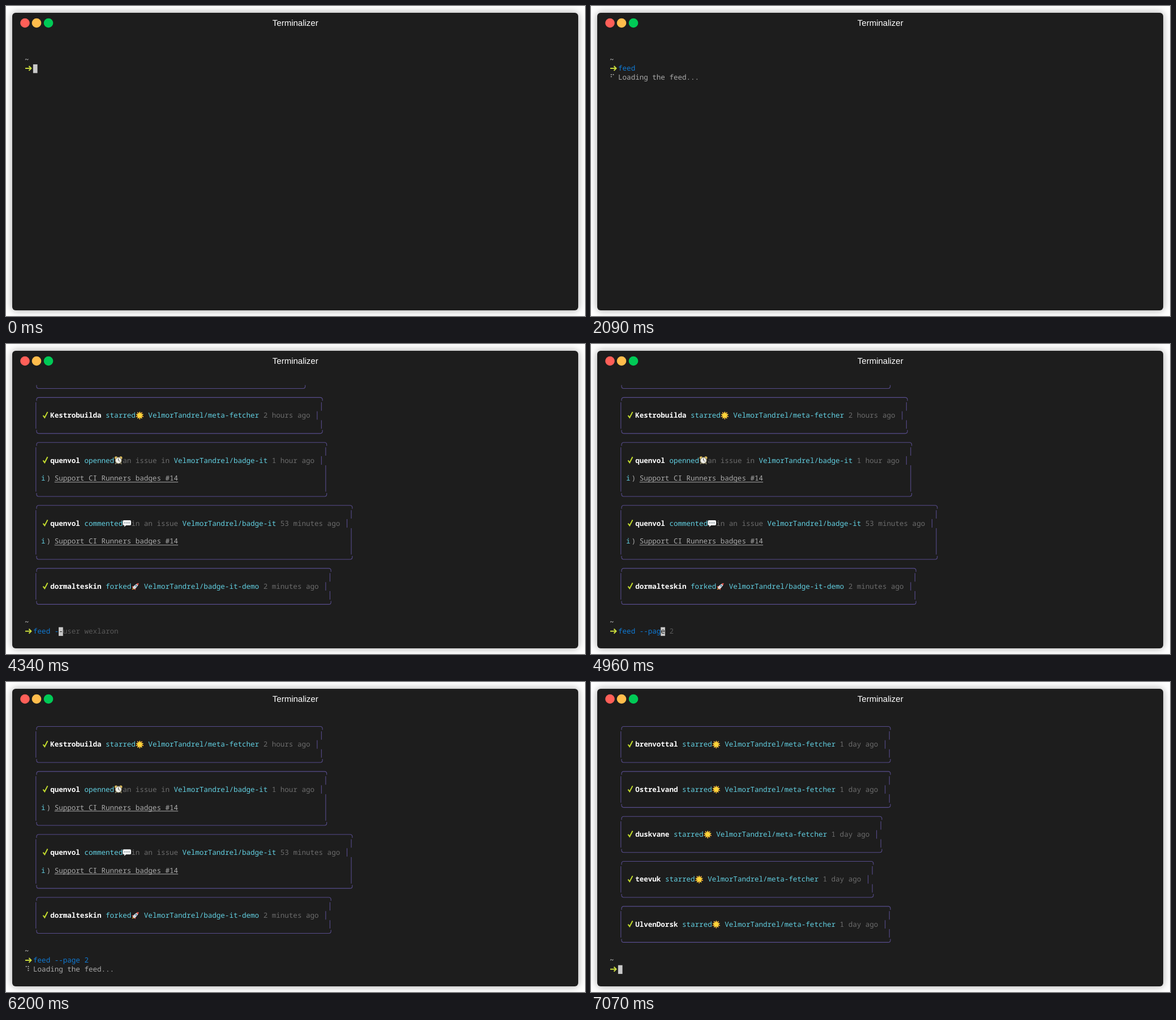
An HTML page for the animation above (8000 ms loop, 1023 by 547 pixels).

```html
<!DOCTYPE html>
<html lang="en">
<head>
<meta charset="utf-8">
<title>Terminal feed</title>
<style>
  html, body { margin: 0; width: 100%; height: 100%; overflow: hidden; background: #fff; }
  .window {
    position: absolute; left: 11px; top: 12px; width: 1000px; height: 525px;
    border-radius: 6px; background: #1d1d1d; box-shadow: 0 0 14px rgba(0, 0, 0, .35);
  }
  svg { position: absolute; left: 0; top: 0; width: 1023px; height: 547px; }
  text {
    font: 12.55px "Noto Sans Mono", "DejaVu Sans Mono", monospace;
    white-space: pre; text-rendering: geometricPrecision; fill: #ababab;
  }
  .title { font: 15px "Liberation Sans", Arial, sans-serif; fill: #fff; text-anchor: middle; }
  .spin { font-family: "DejaVu Sans Mono", monospace; }
  .name { font-weight: 700; fill: #fff; }
  .cyan { fill: #62d0e2; }
  .dim { fill: #6c6c6c; }
  .hint { fill: #595959; }
  .tilde { fill: #d0d0d0; }
  .cmd { fill: #107bd6; }
  .bad { fill: #d63c3c; }
  .under { fill: #1d1d1d; }
  .border { fill: none; stroke: #574c8c; stroke-width: 1.1; }
  .arrow { fill: none; stroke: #c8da3c; stroke-width: 2; }
  .check { fill: none; stroke: #c3dc2e; stroke-width: 2; }
</style>
</head>
<body>
<div class="window"></div>
<svg viewBox="0 0 1023 547">
  <defs>
    <g id="star">
      <path id="rays" fill="none" stroke="#f3a93a" stroke-width="1.8" stroke-linecap="round"/>
      <path id="points" fill="#fdd53a"/>
    </g>
    <g id="clock">
      <path d="M-5.5 6.5L-3 3M5.5 6.5L3 3" stroke="#8d8464" stroke-width="1.8"/>
      <circle cx="-4.2" cy="-4.6" r="2.6" fill="#d9b858"/>
      <circle cx="4.2" cy="-4.6" r="2.6" fill="#d9b858"/>
      <circle r="6" fill="#9c9579"/>
      <circle r="4.7" fill="#f1f1ec"/>
      <path d="M0 -3.5V0L2.4 1.6" fill="none" stroke="#444" stroke-width="1"/>
    </g>
    <g id="bubble">
      <path d="M-5.5 -5.5H5.5Q7.3 -5.5 7.3 -3.5V1.5Q7.3 3.5 5.5 3.5H-1.5L-5 6.2L-4.4 3.5H-5.5Q-7.3 3.5 -7.3 1.5V-3.5Q-7.3 -5.5 -5.5 -5.5Z" fill="#f4f6f7"/>
      <path d="M-3.6 -1h.01M0 -1h.01M3.6 -1h.01" stroke="#6d7b82" stroke-width="2" stroke-linecap="round"/>
    </g>
    <g id="rocket">
      <g transform="rotate(45)">
        <path d="M-2.2 1L-4.6 5H4.6L2.2 1Z" fill="#d8453c"/>
        <path d="M-1.5 5L0 8.5L1.5 5Z" fill="#f5a535"/>
        <path d="M0 -8Q3.2 -4 2.4 5H-2.4Q-3.2 -4 0 -8Z" fill="#d3dade"/>
        <path d="M0 -8Q1.6 -6.3 2.2 -4.5H-2.2Q-1.6 -6.3 0 -8Z" fill="#d8453c"/>
        <circle cy="-1.5" r="1.4" fill="#4a7d9c"/>
      </g>
    </g>
  </defs>
  <circle cx="33.5" cy="30" r="8.3" fill="#ff5f58"/>
  <circle cx="54" cy="30" r="8.3" fill="#ffbd4c"/>
  <circle cx="75" cy="30" r="8.3" fill="#00ca56"/>
  <text class="title" x="511.3" y="35">Terminalizer</text>
  <g id="screen"></g>
</svg>
<script>
const LOOP = 8000, CELL = 7.53, LINE = 15.87;
const OWNER = 'VelmorTandrel';
const ISSUE = 'Support CI Runners badges #14';
const SPINNER = '⠋⠙⠹⠸⠼⠴⠦⠧⠇⠏';
const SPIN_STEP = 70;
const screen = document.getElementById('screen');

const colX = c => 33 + CELL * c;
const rowY = r => 78.5 + LINE * r;

// Five-fold shapes of the star icon
const polar = (radius, step) => {
  const a = (step / 5 - .5) * Math.PI;
  return `${(radius * Math.cos(a)).toFixed(2)} ${(radius * Math.sin(a)).toFixed(2)}`;
};
const tenths = [...Array(10).keys()];
document.getElementById('points').setAttribute('d',
  'M' + tenths.map(i => polar(i % 2 ? 3.4 : 7.3, i)).join('L') + 'Z');
document.getElementById('rays').setAttribute('d',
  tenths.filter(i => i % 2).map(i => `M${polar(3, i)}L${polar(6.2, i)}`).join(''));

const label = (col, row, str, cls = '') =>
  `<text class="${cls}" x="${colX(col)}" y="${rowY(row) + 4.2}">${str}</text>`;

function frameBox(top, rows, right) {
  const y = rowY(top), bottom = rowY(top + rows - 1), edge = right + 1.8;
  const bar = (x, from, to) =>
    `M${x} ${rowY(top + from) - LINE / 2 + .5}V${rowY(top + to) + LINE / 2 - .5}`;
  return `<path class="border" d="M54 ${y + 6}v-2q0 -4 4 -4H${edge - 4}q4 0 4 4v2
    M54 ${bottom - 6}v2q0 4 4 4H${edge - 4}q4 0 4 -4v-2
    ${bar(52.8, 1, rows - 2)}${bar(right, 1, 1)}${bar(right - CELL, 2, 2)}${bar(right, 3, rows - 2)}"/>`;
}

function card(top, { name, verb, icon, link = ' ', repo, ago, issue }) {
  const row = top + 2, y = rowY(row);
  let col = 6, out = `<path class="check" d="M65.5 ${y}l2.8 3.8l5.2 -10"/>`;
  const put = (str, cls) => { out += label(col, row, str, cls); col += str.length; };
  put(name, 'name');
  col++;
  put(verb, 'cyan');
  out += `<use href="#${icon}" x="${colX(col + 1)}" y="${y}"/>`;
  col += 2;
  put(link, 'dim');
  put(`${OWNER}/${repo}`, 'cyan');
  col++;
  put(ago, 'dim');
  if (issue) {
    const lineY = rowY(row + 2) + 6.5;
    out += label(3.85, row + 2, 'i', 'cyan') + label(5.1, row + 2, ')') + label(7, row + 2, issue)
      + `<path d="M${colX(7)} ${lineY}H${colX(7 + issue.length)}" stroke="#ababab"/>`;
  }
  return out + frameBox(top, issue ? 7 : 5, colX(col + 2.5) + 1);
}

function cards(top, list) {
  return list.map(item => {
    const out = card(top, item);
    top += item.issue ? 7 : 5;
    return out;
  }).join('');
}

const starred = (name, ago = '1 day ago') =>
  ({ name, verb: 'starred', icon: 'star', repo: 'meta-fetcher', ago });

const pageOne = [
  starred('Kestrobuilda', '2 hours ago'),
  { name: 'quenvol', verb: 'openned', icon: 'clock', link: 'an issue in ', repo: 'badge-it', ago: '1 hour ago', issue: ISSUE },
  { name: 'quenvol', verb: 'commented', icon: 'bubble', link: 'in an issue ', repo: 'badge-it', ago: '53 minutes ago', issue: ISSUE },
  { name: 'dormalteskin', verb: 'forked', icon: 'rocket', repo: 'badge-it-demo', ago: '2 minutes ago' },
];
const pageTwo = ['brenvottal', 'Ostrelvand', 'duskvane', 'teevuk', 'UlvenDorsk'].map(n => starred(n));

// Last visible line of the card scrolled off the top
const cutCard = `<path class="border" d="M54 ${rowY(0) - 6}v2q0 4 4 4H524.7q4 0 4 -4v-2"/>`;

const cursor = (col, row) =>
  `<rect x="${colX(col) - .2}" y="${rowY(row) - 7.3}" width="7.7" height="15.4" fill="#c9c9c9"/>`;

function prompt(row, typed, hint, showCursor = true) {
  const y = rowY(row) - .2, end = 2 + typed.length;
  let out = label(0, row - 1, '~', 'tilde')
    + `<path class="arrow" d="M34 ${y}h10.5m-4 -4l4 4l-4 4"/>`
    + label(2, row, typed, typed.startsWith('feed') ? 'cmd' : 'bad');
  if (hint) out += label(end, row, hint, 'hint');
  if (showCursor) out += cursor(end, row);
  if (hint) out += label(end, row, hint[0], 'under');
  return out;
}

const loading = (row, step) =>
  label(0, row, SPINNER[step % SPINNER.length], 'spin') + label(2, row, 'Loading the feed...');

const history = ['feed --user wexlaron', 'feed --page 2'];
const runs = [
  { cmd: 'feed', keys: [300, 440, 670, 1020], enter: 1390, stop: 2140, done: 2160,
    past: history, row: 2, runRow: 2, before: '', during: '' },
  { cmd: 'feed --page 2',
    keys: [3110, 3380, 3520, 3720, 4050, 4340, 4460, 4640, 4780, 4960, 5090, 5280, 5460],
    enter: 6060, stop: 7050, done: 7070,
    past: ['feed', ...history], row: 27, runRow: 26,
    before: cutCard + cards(1, pageOne), during: cards(0, pageOne) },
];

function picture(t) {
  const run = runs.find(r => t < r.done);
  if (!run) return cards(0, pageTwo) + prompt(27, '', '');
  const { cmd, keys, enter, stop, past, row, runRow, before, during } = run;
  if (t < enter) {
    const typed = cmd.slice(0, keys.filter(k => k <= t).length);
    const match = typed && past.find(p => p.startsWith(typed));
    return before + prompt(row, typed, match ? match.slice(typed.length) : '');
  }
  const tail = t < stop
    ? loading(runRow + 1, Math.floor((t - enter) / SPIN_STEP))
    : cursor(0, runRow + 1);
  return during + prompt(runRow, cmd, '', false) + tail;
}

let shown;
const start = performance.now();
function tick() {
  const markup = picture((performance.now() - start) % LOOP);
  if (markup !== shown) screen.innerHTML = shown = markup;
  requestAnimationFrame(tick);
}
tick();
</script>
</body>
</html>
```
